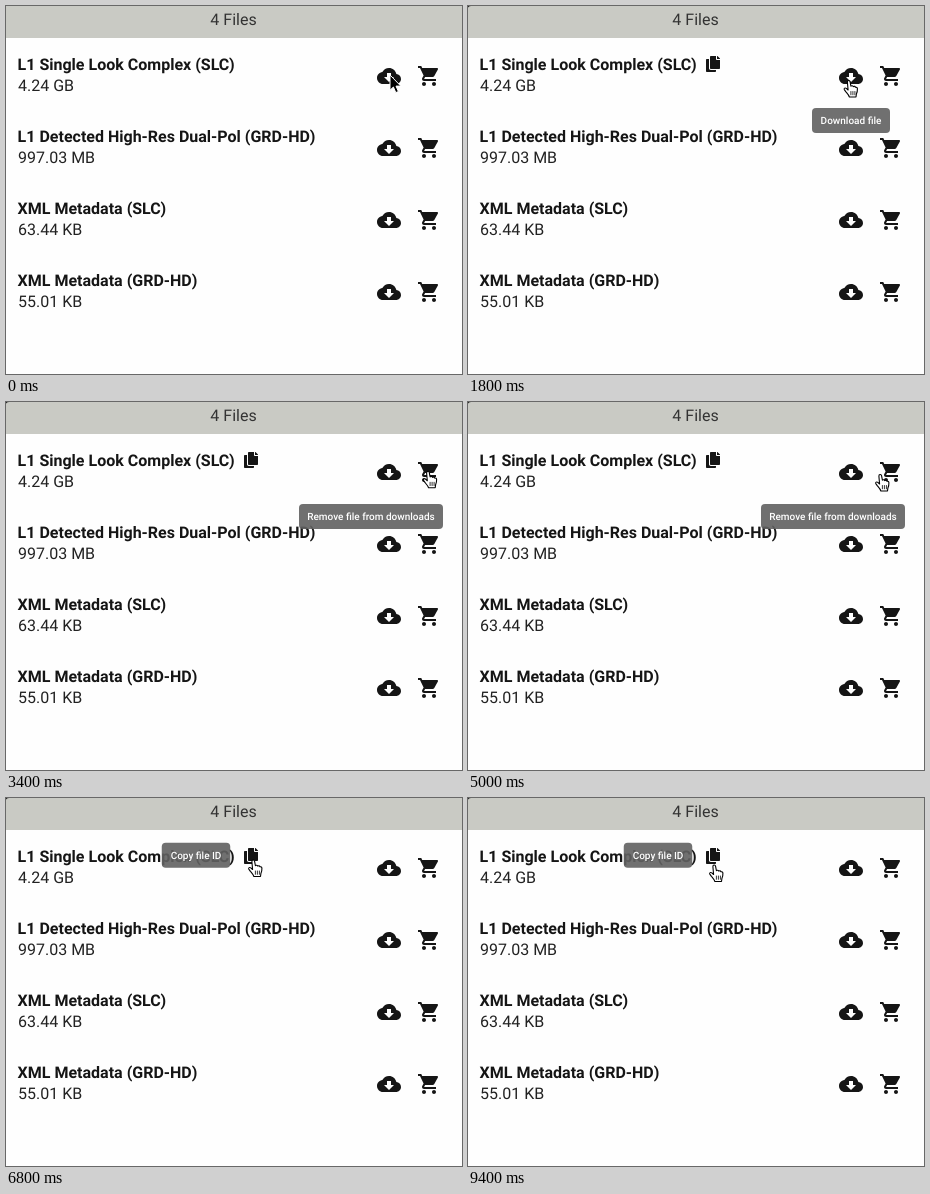
Recreate the animation shown at these times as an HTML page. Size 456x368 px, loop 9600 ms.

```html
<!DOCTYPE html>
<html lang="en">
<head>
<meta charset="utf-8">
<title>File list</title>
<style>
  html, body { margin: 0; width: 100%; height: 100%; overflow: hidden; background: #fefefe; }
  svg { display: block; width: 456px; height: 368px; }
  text { font-family: Roboto, "Open Sans", sans-serif; font-size: 16px; fill: #222; text-rendering: geometricPrecision; }
  .title { font-weight: 700; fill: #151515; }
  .tip text { font-size: 10px; font-weight: 500; fill: #fff; text-anchor: middle; }
  .tip rect { fill: #616161; fill-opacity: .9; }
</style>
</head>
<body>
<svg viewBox="0 0 456 368">
  <defs>
    <path id="cloud" d="M19.35 10.04C18.67 6.59 15.64 4 12 4 9.11 4 6.6 5.64 5.35 8.04 2.34 8.36 0 10.91 0 14c0 3.31 2.69 6 6 6h13c2.76 0 5-2.24 5-5 0-2.64-2.05-4.78-4.65-4.96zM17 13l-5 5-5-5h3V9h4v4h3z"/>
    <path id="cart" d="M7 18c-1.1 0-1.99.9-1.99 2S5.9 22 7 22s2-.9 2-2-.9-2-2-2zM1 2v2h2l3.6 7.59-1.35 2.45c-.16.28-.25.61-.25.96 0 1.1.9 2 2 2h12v-2H7.42c-.14 0-.25-.11-.25-.25l.03-.12.9-1.63h7.45c.75 0 1.41-.41 1.75-1.03l3.58-6.49c.08-.14.12-.31.12-.48 0-.55-.45-1-1-1H5.21l-.94-2H1zm16 16c-1.1 0-1.99.9-1.99 2s.89 2 1.99 2 2-.9 2-2-.9-2-2-2z"/>
  </defs>
  <rect width="456" height="368" fill="#fefefe"/>
  <rect width="456" height="32" fill="#c9cac4"/>
  <text x="227.5" y="19" text-anchor="middle" style="fill:#333">4 Files</text>
  <path id="corner" d="M0 0H3Q0 0 0 2z"/>
  <g id="rows" fill="#151515"></g>
  <path id="copy" transform="translate(238 50) scale(.03125)" fill="#151515" d="M320 448v40c0 13.255-10.745 24-24 24H24c-13.255 0-24-10.745-24-24V120c0-13.255 10.745-24 24-24h72v296c0 30.879 25.121 56 56 56h168zm0-344V0H152c-13.255 0-24 10.745-24 24v368c0 13.255 10.745 24 24 24h272c13.255 0 24-10.745 24-24V128H344c-13.2 0-24-10.8-24-24zm120.971-31.029L375.029 7.029A24 24 0 0 0 358.059 0H352v96h96v-6.059a24 24 0 0 0-7.029-16.97z"/>
  <g id="tips"></g>
  <path id="arrow" d="M0 0V15.2L3.4 12 5.8 17.6 8.4 16.5 6 11.1H10.8z" stroke="#fff"/>
  <g id="hand" stroke="#000" stroke-linejoin="round" stroke-linecap="round">
    <path fill="#fff" stroke-width="1.1" d="M3.9 2.2C3.8 .1 6.3 0 6.6 1.9L7.4 6.2C8.1 5.4 9.5 5.6 9.8 6.6 10.5 6 11.8 6.3 12 7.3 13 7 13.9 7.6 13.9 8.8 14 11 13.7 12.4 12.9 14L12.5 17H5.9C5.5 15.4 3.8 13.6 2.4 11.9L.8 9.6C.1 8.3 1.7 7.4 2.8 8.4L4.6 10z"/>
    <path fill="none" stroke-width=".8" d="M7.4 11.5v3.3M9.4 11.5v3.3M11.4 11.5v3.3"/>
  </g>
</svg>
<script>
const LOOP = 9600, STEP = 200;
const $ = id => document.getElementById(id);

const files = [
  ['L1 Single Look Complex (SLC)', '4.24 GB'],
  ['L1 Detected High-Res Dual-Pol (GRD-HD)', '997.03 MB'],
  ['XML Metadata (SLC)', '63.44 KB'],
  ['XML Metadata (GRD-HD)', '55.01 KB']
];
$('rows').innerHTML = files.map(([title, size], i) => `
  <g transform="translate(0 ${i * 72})">
    <text class="title" x="11.6" y="64">${title}</text>
    <text x="12" y="85">${size}</text>
    <use href="#cloud" x="371" y="58"/>
    <use href="#cart" x="411" y="58"/>
  </g>`).join('');

const tips = [
  { label: 'Download file', x: 383, y: 114.5, width: 78, from: 1600, to: 2400 },
  { label: 'Remove file from downloads', x: 365, y: 114.5, width: 144, from: 2800, to: 5200 },
  { label: 'Copy file ID', x: 190, y: 57.3, width: 68.5, from: 5800, to: LOOP }
];
$('tips').innerHTML = tips.map(({ label, width }) => `
  <g class="tip">
    <rect x="${-width / 2}" y="-12.5" width="${width}" height="25" rx="4"/>
    <text y="3.5">${label}</text>
  </g>`).join('');
const tipNodes = [...$('tips').children];

// Each move eases the pointer from where it rests to a new place
const rest = { x: 384, y: 69 };
const moves = [
  { from: 200, to: 800, x: 375.5, y: 74 },
  { from: 2200, to: 3200, x: 418, y: 68 },
  { from: 3400, to: 3800, x: 413, y: 71 },
  { from: 4200, to: 5000, x: 407, y: 72 },
  { from: 5200, to: 5400, x: 144, y: 74 },
  { from: 5600, to: 5800, x: 241.5, y: 64 },
  { from: 6000, to: 6200, x: 250, y: 64 },
  { from: 6400, to: 6800, x: 242, y: 61.5 },
  { from: 8400, to: 9400, x: 241, y: 66.5 }
];

const clamp = v => Math.min(1, Math.max(0, v));
const smooth = p => p * p * (3 - 2 * p);
const show = (node, visible) => node.setAttribute('visibility', visible ? 'visible' : 'hidden');

function pointerAt(t) {
  return moves.reduce((at, { from, to, x, y }) => {
    const p = smooth(clamp((t - from + STEP) / (to - from + STEP)));
    return { x: at.x + (x - at.x) * p, y: at.y + (y - at.y) * p };
  }, rest);
}

function renderTip(tip, node, t) {
  const opacity = t < tip.to ? clamp(.75 * ((t - tip.from) / STEP + 1)) : 0;
  const scale = .95 + .05 * opacity;
  node.setAttribute('opacity', opacity);
  node.setAttribute('transform', `translate(${tip.x} ${tip.y}) scale(${scale})`);
}

function render(t) {
  const { x, y } = pointerAt(t);
  for (const id of ['arrow', 'hand']) {
    $(id).setAttribute('transform', `translate(${x} ${y})`);
    show($(id), (id === 'hand') === (t >= 400));
  }
  show($('corner'), t >= 200);
  show($('copy'), t >= 1200);
  tips.forEach((tip, i) => renderTip(tip, tipNodes[i], t));
}

const start = performance.now();
function tick() {
  const t = (performance.now() - start) % LOOP;
  render(Math.floor(t / STEP) * STEP);
  requestAnimationFrame(tick);
}
tick();
</script>
</body>
</html>
```
